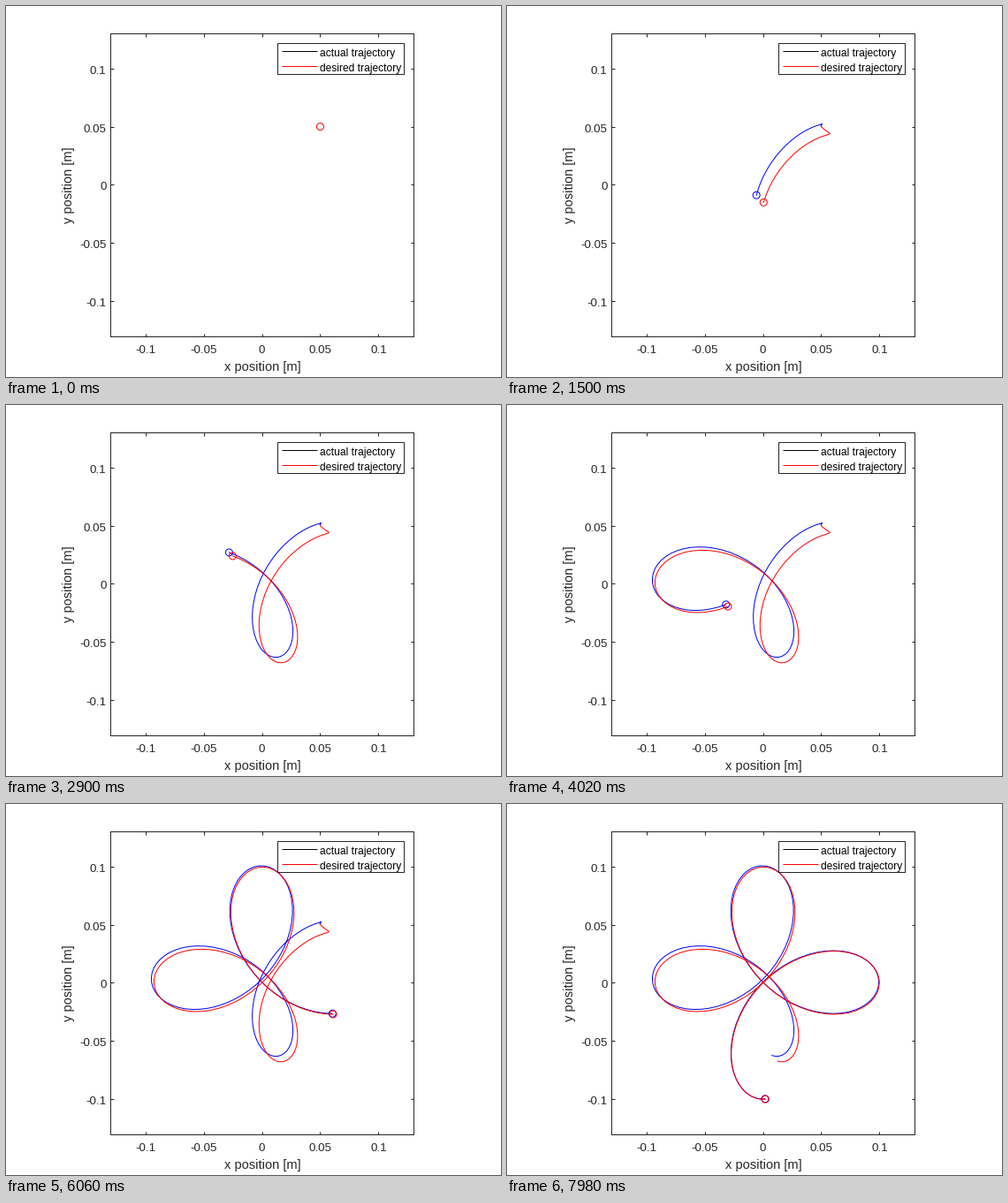
These frames come from a looping animation (560 px wide and 420 px high, 8 s). A matplotlib script:

```python
import numpy as np
import matplotlib.pyplot as plt
from matplotlib.animation import FuncAnimation
from matplotlib.lines import Line2D
from matplotlib.patches import Circle, Rectangle

W, H, DPI = 560, 420, 100
PX = 72 / DPI            # points per pixel
LIM = 0.13               # axis limit in metres
LEFT, TOP, SIDE = 118, 31, 343
UNIT = 2 * LIM / SIDE    # metres per pixel
DARK = "#262626"
TICKS = (-0.1, -0.05, 0, 0.05, 0.1)

HOLD, STEP, FRAMES = 25, 2, 400   # in 20 ms frames
TRAIL = 150                       # points kept behind the marker
DT = 0.04                         # seconds per point
LAST = (FRAMES - 1 - HOLD) // STEP + 1

plt.rcParams["font.family"] = "Liberation Sans"
fig = plt.figure(figsize=(W / DPI, H / DPI), dpi=DPI, facecolor="white")
ax = fig.add_axes([LEFT / W, 1 - (TOP + SIDE) / H, SIDE / W, SIDE / H])
ax.set(xlim=(-LIM, LIM), ylim=(-LIM, LIM), xticks=TICKS, yticks=TICKS)
ax.tick_params(direction="in", top=True, right=True, length=3.5 * PX, width=PX,
               color=DARK, labelbottom=False, labelleft=False)
for spine in ax.spines.values():
    spine.set(linewidth=PX, color=DARK)


def label(x, y, text, size, color=DARK, ha="center", **kw):
    """Put text with its baseline at pixel (x, y), measured from the top left."""
    fig.text(x / W, 1 - y / H, text, fontsize=size * PX, color=color, ha=ha,
             va="baseline", zorder=12, **kw)


def legend_line(y, color):
    fig.add_artist(Line2D([312 / W, 352 / W], [1 - y / H] * 2, color=color,
                          lw=PX, zorder=11, solid_capstyle="butt"))


for v in TICKS:
    shift = v / UNIT
    label(LEFT + SIDE / 2 + shift, 393, f"{v:g}", 13.33)
    label(113.5, TOP + SIDE / 2 - shift + 5.98, f"{v:g}", 13.33, ha="right")
label(290, 413, "x position [m]", 14.67)
label(75, 202.5, "y position [m]", 14.67, rotation=90, rotation_mode="anchor")

fig.add_artist(Rectangle((307 / W, 1 - 77 / H), 143 / W, 35 / H, fc="white",
                         ec=DARK, lw=PX, zorder=10))
for y, name, color in ((51, "actual trajectory", "black"),
                       (68, "desired trajectory", "red")):
    legend_line(y, color)
    label(355, y + 6, name, 12, color="black", ha="left")

# Four-petal rose, blended in from the start point
t = DT * np.arange(LAST + 1)
theta = np.pi / 3 * t
rose = 0.1 * np.cos(2 * theta) * np.array([np.cos(theta), np.sin(theta)])
start = np.array([[0.05], [0.05]])
fade = np.exp(-t)
desired = rose * (1 - fade) + start * fade

# Overdamped tracking error, quicker to build up in y than in x
rise = np.array([[6], [9]])
error = 0.0105 * (np.exp(-0.51 * t) - np.exp(-rise * t))
actual = desired + np.array([[-1], [1]]) * error


def make_pair(color, z):
    line, = ax.plot([], [], color=color, lw=PX, zorder=z)
    ring = ax.add_patch(Circle((0, 0), 4 * UNIT, fill=False, ec=color, lw=PX,
                               zorder=z + 2))
    return line, ring


blue_line, blue_ring = make_pair("blue", 3)
red_line, red_ring = make_pair("red", 4)
pairs = [(actual, blue_line, blue_ring), (desired, red_line, red_ring)]


def draw(i):
    k = 0 if i < HOLD else (i - HOLD) // STEP + 1
    first = max(0, k - TRAIL)
    for path, line, ring in pairs:
        line.set_data(path[:, first:k + 1])
        ring.center = path[:, k]
    blue_ring.set_visible(k > 0)
    return [blue_line, red_line, blue_ring, red_ring]


anim = FuncAnimation(fig, draw, frames=FRAMES, interval=20, repeat=True,
                     repeat_delay=0, blit=False)
plt.show()
```
